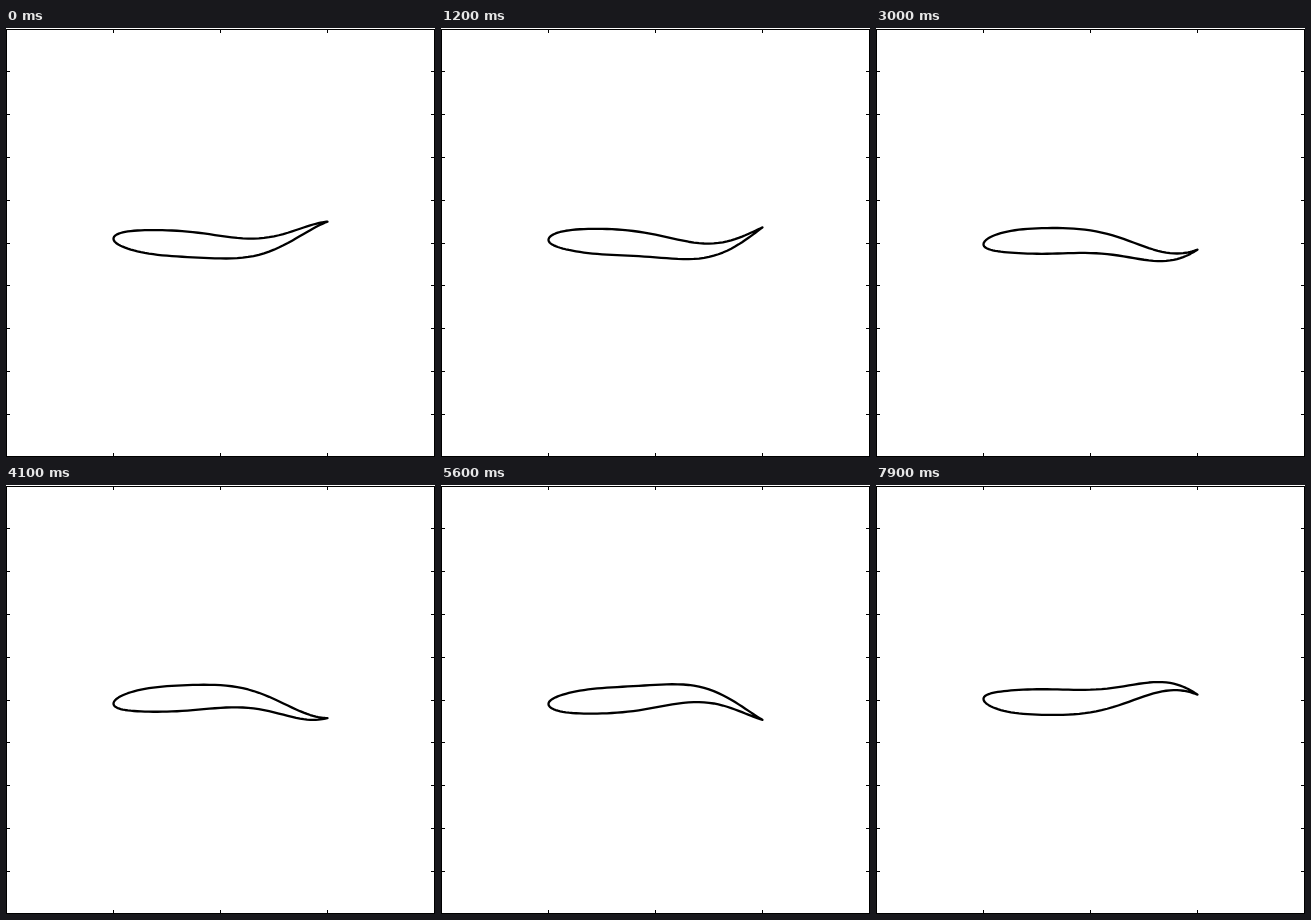
These frames come from a looping animation (429x429 px, 8 s). An HTML page:

```html
<!DOCTYPE html>
<html lang="en">
<head>
<meta charset="utf-8">
<title>Swimming foil</title>
<style>
  html, body { margin: 0; width: 100%; height: 100%; overflow: hidden; background: #fff; }
  svg { display: block; width: 100vw; height: 100vh; }
  path { fill: none; }
  #axes { stroke: #000; stroke-width: 1; shape-rendering: crispEdges; }
  #foil { stroke: #000; stroke-width: 2.3; stroke-linejoin: round; }
</style>
</head>
<body>
<svg viewBox="0 0 429 429">
  <path id="axes"/>
  <path id="foil"/>
</svg>
<script>
const STEP = 100, STEPS = 80, STEPS_PER_BEAT = 100;
const CHORD = 214, NOSE_X = 107.5, MID_Y = 215, SAMPLES = 120;

function axesPath() {
  const tick = 4;
  let d = 'M.5 1.5H428.5V428.5H.5Z';
  for (let i = 1; i < 4; i++) {
    const x = i * 107 + 0.5;
    d += `M${x} 1v${tick}M${x} 429v${-tick}`;
  }
  for (let i = 1; i < 10; i++) {
    const y = Math.round(0.5 + i * 42.8) + 0.5;
    d += `M0 ${y}h${tick}M429 ${y}h${-tick}`;
  }
  return d;
}

// Half thickness of a 12% symmetric NACA section
const thickness = x =>
  0.6 * (0.2969 * Math.sqrt(x) - 0.126 * x - 0.3516 * x ** 2 + 0.2843 * x ** 3 - 0.1036 * x ** 4);

// Travelling wave whose amplitude grows towards the tail
const midline = (x, phase) =>
  (0.02 - 0.0825 * x + 0.1625 * x * x) * Math.cos(2 * Math.PI * x - phase);

function foilPath(phase) {
  const points = [];
  for (let i = 0; i <= SAMPLES; i++) {
    const angle = 2 * Math.PI * i / SAMPLES;
    const x = (1 + Math.cos(angle)) / 2;
    const side = i <= SAMPLES / 2 ? 1 : -1;
    const y = midline(x, phase) + side * thickness(x);
    points.push(`${(NOSE_X + CHORD * x).toFixed(2)} ${(MID_Y - CHORD * y).toFixed(2)}`);
  }
  return 'M' + points.join('L') + 'Z';
}

const foil = document.getElementById('foil');
document.getElementById('axes').setAttribute('d', axesPath());

function draw(time) {
  const step = Math.floor(time / STEP) % STEPS;
  foil.setAttribute('d', foilPath(2 * Math.PI * step / STEPS_PER_BEAT));
  requestAnimationFrame(draw);
}
draw(0);
</script>
</body>
</html>
```
